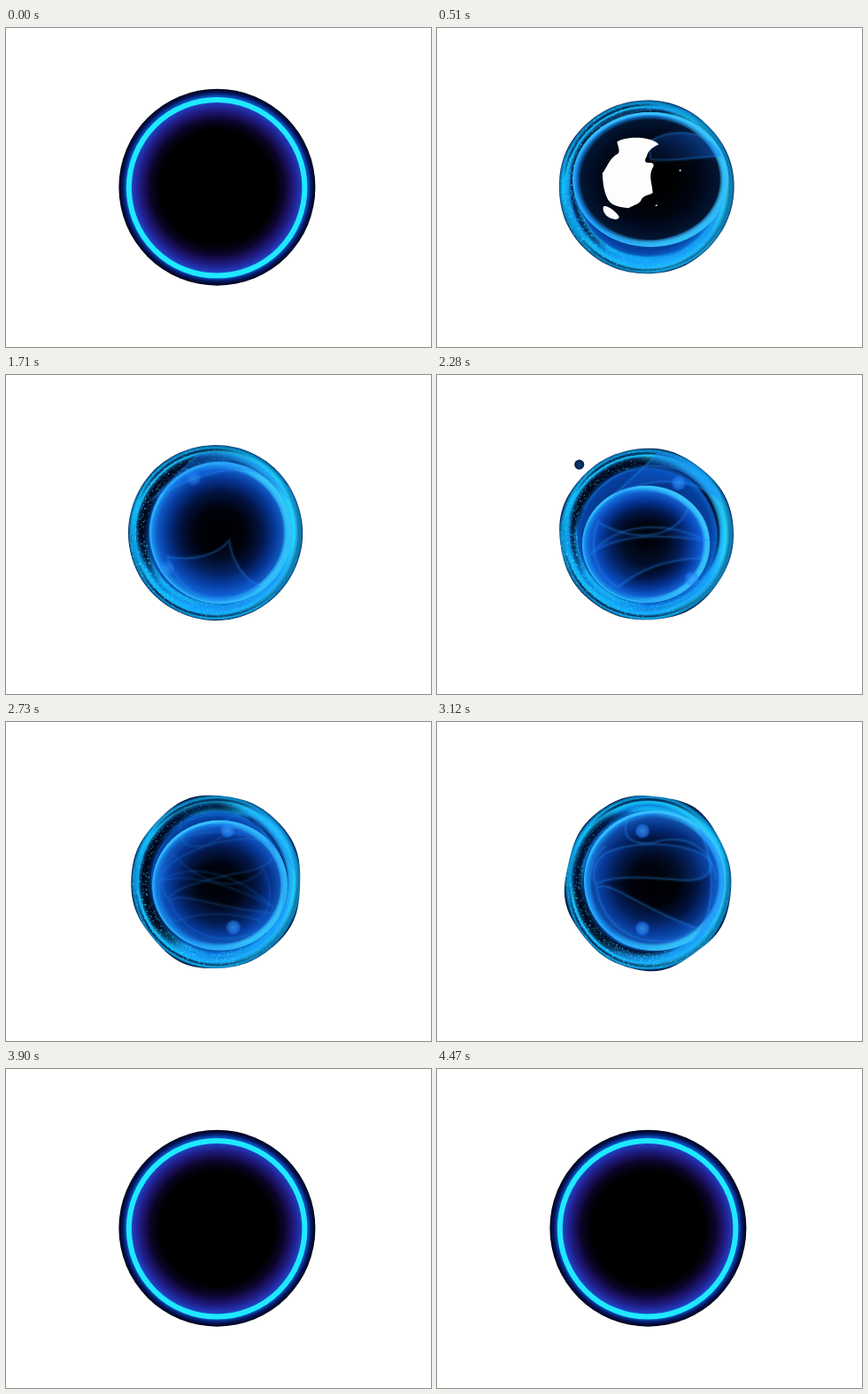
An HTML page with a canvas for the animation above (4.5 s loop, 480 by 360 pixels).

```html
<!DOCTYPE html>
<html lang="en">
<head>
<meta charset="utf-8">
<title>Liquid orb</title>
<style>
html, body { margin: 0; width: 100%; height: 100%; overflow: hidden; background: #fff; }
canvas { display: block; width: 480px; height: 360px; }
</style>
</head>
<body>
<canvas id="stage" width="480" height="360"></canvas>
<script>
const ctx = document.getElementById('stage').getContext('2d');
const LOOP = 4500, TAU = Math.PI * 2, RAD = Math.PI / 180;

// time | body x y rx ry | sphere x y rx ry | light, wobble | dark, rim, speck angles | spots x y x y alpha
const poses = [
  [990, 236.5, 179.5, 99, 98, 241, 171, 88, 76, .2, .004, 250, 25, 175, 205, 125, 185, 215, 0],
  [1710, 236.5, 178, 98.5, 99, 242, 178, 80, 80, .8, .002, 215, 0, 170, 212, 117, 182, 218, .5],
  [2280, 236.5, 180, 98.5, 97, 236, 191, 72, 66, .85, .009, 245, 0, 160, 273, 122, 288, 230, .75],
  [3120, 238.5, 181, 94, 99, 246, 179, 80, 79, .68, .02, 130, 20, 120, 232, 123, 232, 233, .8],
  [3510, 240, 178, 99.5, 99, 239, 179, 74, 79, .55, .002, -40, 170, 20, 280, 141, 197, 182, .35]
];

const veils = [
  ['M256 132C285 124 325 140 328 174C300 165 272 162 251 151Z',
   'M155 140C150 190 185 245 240 242C275 243 300 236 318 220',
   'M150 130C170 95 260 75 312 118'],
  ['M182 205C210 210 238 204 252 187C256 212 270 232 288 238C255 268 198 258 182 205Z',
   'M215 91C255 82 296 96 318 140C290 100 250 92 165 140Z',
   'M318 125C345 185 320 250 240 266'],
  ['M165 152C195 92 285 85 314 140C340 205 305 250 225 258',
   'M250 88C285 92 310 112 320 142C290 116 245 112 198 137Z',
   'M176 200C205 165 260 165 306 187C270 182 215 175 176 200Z',
   'M284 150C302 166 307 190 298 207C262 208 230 218 205 240C178 225 170 194 182 166C225 190 268 185 284 150Z'],
  ['M184 153C205 132 290 132 309 157C313 174 298 181 270 178C225 174 192 174 180 184C174 175 176 163 184 153Z',
   'M180 187C198 178 218 205 292 232C265 262 190 252 180 187Z',
   'M190 140C150 175 180 258 238 256',
   'M295 120C335 150 335 215 290 245C312 220 318 165 295 120Z',
   'M218 103C205 128 217 140 245 136C286 124 312 146 315 178'],
  ['M165 160C190 158 236 147 248 117',
   'M263 116C285 152 283 208 235 245C270 258 308 222 311 178C296 160 278 140 263 116Z',
   'M157 190C195 192 245 184 283 152',
   'M176 220C184 206 205 222 235 246C215 258 188 248 176 220Z',
   'M158 150C170 82 268 68 318 134C345 190 300 262 235 270']
].map(set => set.map(d => ({ path: new Path2D(d), closed: d.endsWith('Z') })));

const hole = new Path2D('M208 107C216 102 238 104 251 108C266 113 276 119 278 125' +
  'C268 127 257 132 254 141C246 149 250 152 258 153C268 157 260 161 256 169C251 181 254 192 252 205' +
  'C245 208 237 206 231 212C227 220 215 220 206 223C190 219 177 213 173 200' +
  'C169 184 171 167 173 155C183 147 190 131 206 127C211 123 208 113 208 107Z' +
  'M164 212C170 210 185 226 187 235C184 241 174 237 167 230C162 224 161 215 164 212Z' +
  'M304.5 176a1.5 1.5 0 1 0 3 0a1.5 1.5 0 1 0-3 0M251 228L256 226L255 229Z');

const holeSize = [[300, 0], [650, 1], [990, 1], [1150, .8], [1420, 0]];
const ringShow = [[150, 1], [530, 0], [3600, 0], [3800, 1]];
const drops = [
  { a: 27.2, path: [[560, 90], [760, 129], [850, 129], [990, 122.5], [1080, 118], [1380, 90]] },
  { a: 225.6, path: [[2130, 90], [2280, 109], [2400, 110], [2580, 90]] },
  { a: -90, path: [[3520, 90], [3680, 111], [3800, 92]] }
];

let seed = 11;
const rnd = () => (seed = seed * 16807 % 2147483647) / 2147483647;
const specks = Array.from({ length: 1100 }, () =>
  ({ a: rnd() * TAU, r: .8 + .19 * rnd(), s: .5 + rnd() * .9, o: .25 + .75 * rnd() }));
const streaks = Array.from({ length: 16 }, (_, i) =>
  ({ a: rnd() * 360, r: .82 + .14 * rnd(), w: .03 + .05 * rnd(), half: 25 + 40 * rnd(), rgb: i % 2 ? '0,14,52' : '20,190,250' }));

const ease = u => u * u * (3 - 2 * u);

function track(keys, t) {
  if (t <= keys[0][0]) return keys[0][1];
  for (let i = 1; i < keys.length; i++) {
    const [t0, v0] = keys[i - 1], [t1, v1] = keys[i];
    if (t < t1) return v0 + (v1 - v0) * ease((t - t0) / (t1 - t0));
  }
  return keys[keys.length - 1][1];
}

const poseAt = t => poses[0].map((_, i) => track(poses.map(p => [p[0], p[i]]), t));

function radial(r1, stops) {
  const g = ctx.createRadialGradient(0, 0, 0, 0, 0, r1);
  stops.forEach(([at, color]) => g.addColorStop(at, color));
  return g;
}

function disc(r, fill) {
  ctx.beginPath();
  ctx.arc(0, 0, r, 0, TAU);
  ctx.fillStyle = fill;
  ctx.fill();
}

function within(x, y, rx, ry, paint) {
  ctx.save();
  ctx.translate(x, y);
  ctx.scale(rx, ry);
  paint();
  ctx.restore();
}

// A band that fades out both along its arc and across its width.
function softArc(r, mid, half, rgb, width, alpha) {
  const g = ctx.createConicGradient((mid - 180) * RAD, 0, 0);
  const h = half / 360, clear = `rgba(${rgb},0)`, full = `rgba(${rgb},${alpha / 2})`;
  [[.5 - h, clear], [.5 - h * .5, full], [.5 + h * .5, full], [.5 + h, clear]]
    .forEach(([at, color]) => g.addColorStop(at, color));
  ctx.strokeStyle = g;
  for (const k of [1, .75, .5, .25]) {
    ctx.beginPath();
    ctx.arc(0, 0, r, 0, TAU);
    ctx.lineWidth = width * k;
    ctx.stroke();
  }
}

function blob(x, y, rx, ry, wob, t) {
  ctx.beginPath();
  for (let i = 0; i < 120; i++) {
    const a = i / 120 * TAU;
    const r = 1 + wob * (Math.sin(5 * a + t * .004) * .6 + Math.sin(8 * a - t * .003) * .4);
    ctx.lineTo(x + rx * r * Math.cos(a), y + ry * r * Math.sin(a));
  }
  ctx.closePath();
}

function drawShell(dark, rim, speck, t) {
  disc(1.05, radial(1, [[0, '#03102c'], [.74, '#0640a0'], [.84, '#0a70d4'],
    [.92, '#10a4ea'], [.97, '#0a8cc8'], [.99, '#0664a0'], [1, '#03204c']]));
  for (const s of streaks) softArc(s.r, s.a + t * .014, s.half, s.rgb, s.w, .7);
  softArc(.84, dark, 65, '0,6,26', .14, 1.1);
  softArc(.87, dark + 75, 40, '0,10,40', .12, .7);
  softArc(.9, rim, 100, '40,215,255', .13, .8);
  softArc(.88, 70, 60, '20,150,255', .14, .5);
  ctx.fillStyle = '#3ce6ff';
  for (const p of specks) {
    const a = p.a + t * .00025;
    ctx.globalAlpha = p.o * (.5 + .4 * Math.cos(a - speck * RAD));
    const s = p.s / 98;
    ctx.fillRect(p.r * Math.cos(a), p.r * Math.sin(a), s, s);
  }
  ctx.globalAlpha = 1;
}

function drawSphere(light, rim) {
  const tone = (r, g, b) => `rgb(${r * light},${g * light},${b * light})`;
  disc(1, radial(1, [[0, '#000'], [.35, tone(0, 3, 14)], [.58, tone(2, 25, 84)],
    [.76, tone(7, 66, 184)], [.89, tone(20, 112, 245)], [.96, '#168aec'], [1, '#35c0fa']]));
  softArc(.95, rim, 110, '60,210,255', .11, .6);
  softArc(.98, -80, 90, '60,200,255', .05, .7);
}

function drawVeils(t) {
  const shade = ctx.createRadialGradient(238, 178, 15, 238, 178, 92);
  shade.addColorStop(0, 'rgba(10,60,190,.05)');
  shade.addColorStop(1, 'rgba(20,125,255,.45)');
  poses.forEach((p, i) => {
    const before = i ? poses[i - 1][0] : -1e4;
    const after = i < poses.length - 1 ? poses[i + 1][0] : 1e4;
    const w = t < p[0] ? (t - before) / (p[0] - before) : (after - t) / (after - p[0]);
    if (w <= 0) return;
    ctx.save();
    ctx.globalAlpha = Math.min(1, w);
    ctx.translate(238, 179);
    ctx.rotate((t - p[0]) * .0007);
    ctx.translate(-238, -179);
    ctx.fillStyle = shade;
    for (const { path, closed } of veils[i]) {
      if (closed) ctx.fill(path);
      [[5, .08], [2.5, .1], [1, .2]].forEach(([width, alpha]) => {
        ctx.strokeStyle = `rgba(45,150,255,${alpha})`;
        ctx.lineWidth = width;
        ctx.stroke(path);
      });
    }
    ctx.restore();
  });
}

function drawLiquid(t) {
  const [, x, y, rx, ry, sx, sy, srx, sry, light, wob, dark, rim, speck, ax, ay, bx, by, spots] = poseAt(t);
  ctx.save();
  blob(x, y, rx, ry, wob, t);
  ctx.clip();
  within(x, y, rx, ry, () => drawShell(dark, rim, speck, t));
  within(sx, sy, srx, sry, () => drawSphere(light, rim));
  drawVeils(t);
  [[ax, ay], [bx, by]].forEach(([px, py]) => within(px, py, 9, 9, () => {
    ctx.globalAlpha = spots;
    disc(1, radial(1, [[0, 'rgba(60,165,255,.9)'], [.7, 'rgba(40,135,255,.7)'], [1, 'rgba(30,110,255,0)']]));
  }));
  const size = track(holeSize, t);
  if (size > .01) {
    ctx.translate(215, 165);
    ctx.scale(size, size);
    ctx.rotate((t - 990) * .0004);
    ctx.translate(-215, -165);
    ctx.fillStyle = '#fff';
    ctx.fill(hole);
  }
  ctx.restore();
}

function drawDrops(t) {
  for (const { a, path } of drops) {
    if (t < path[0][0] || t > path[path.length - 1][0]) continue;
    const d = track(path, t);
    within(237 + d * Math.cos(a * RAD), 179 + d * Math.sin(a * RAD), 5.6, 5.6,
      () => disc(1, radial(1, [[0, '#0c3c74'], [.7, '#082c5c'], [1, '#04183a']])));
  }
}

function drawRing(show) {
  const k = .89 + .11 * show;
  ctx.globalAlpha = show;
  within(238.4, 179.7, k, k, () => {
    disc(111, radial(111, [[0, '#000'], [.58, '#000'], [.68, '#0a0528'], [.75, '#1b1264'],
      [.8, '#20208c'], [.85, '#2138b4'], [.89, '#1e58d8'], [.93, '#0a48b0'],
      [.955, '#051c68'], [.98, '#020a38'], [1, '#000214']]));
    ctx.beginPath();
    ctx.arc(-.3, .6, 99.3, 0, TAU);
    ctx.lineWidth = 6;
    ctx.strokeStyle = '#1fe9ff';
    ctx.stroke();
  });
  ctx.globalAlpha = 1;
}

function draw(t) {
  ctx.fillStyle = '#fff';
  ctx.fillRect(0, 0, 480, 360);
  const show = track(ringShow, t);
  if (show < 1) {
    drawDrops(t);
    drawLiquid(t);
  }
  if (show > 0) drawRing(show);
}

const start = performance.now();
function tick() {
  draw((performance.now() - start) % LOOP);
  requestAnimationFrame(tick);
}
tick();
</script>
</body>
</html>
```
